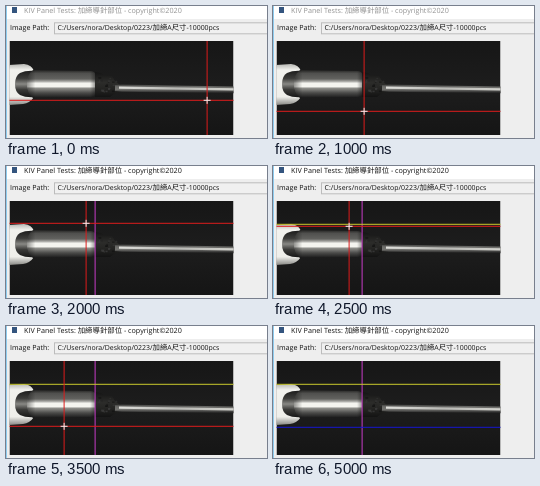
These frames come from a looping animation (261 px wide and 132 px high, 5.5 s). An HTML page with a canvas:

```html
<!DOCTYPE html>
<html lang="zh-Hant">
<head>
<meta charset="utf-8">
<style>
html, body { margin: 0; width: 100%; height: 100%; overflow: hidden; background: #eeeeee; }
#stage { position: relative; width: 261px; height: 132px; overflow: hidden; }
canvas { position: absolute; left: 0; top: 0; display: block; }
.row {
  position: absolute; white-space: pre; line-height: 12px; height: 12px; color: #111;
  font: 7.1px/12px "Open Sans", "Noto Sans", "Noto Sans CJK TC", "Noto Sans CJK", sans-serif;
  text-rendering: geometricPrecision;
}
.row b { font: 7.4px/12px "Noto Sans CJK TC", "Noto Sans CJK", sans-serif; }
#title { left: 18px; top: -1px; font-size: 7.2px; }
#label { left: 4px; top: 16px; }
#path { left: 51.5px; top: 16px; font-size: 6.95px; }
</style>
</head>
<body>
<div id="stage">
  <canvas id="view" width="261" height="132"></canvas>
  <div class="row" id="title">KIV Panel Tests: <b>加締導針部位</b> - copyright©2020</div>
  <div class="row" id="label">Image Path:</div>
  <div class="row" id="path">C:/Users/nora/Desktop/0223/<b>加締</b>A<b>尺寸</b>-10000pcs</div>
</div>
<script>
const ctx = document.getElementById('view').getContext('2d');
const title = document.getElementById('title');
const STEP = 500, LOOP = 5500;
const PHOTO = { x: 3.5, y: 35, w: 224, h: 94 };
const RED = '#dc1c1c', PINK = '#c83cc8', YELLOW = '#c8c82c', BLUE = '#1616d0';

// pointer position for each half second; null hides it
const pointer = [
  [201, 94], [146, 101], [91, 105], [87, 84], [80, 57], [76, 60],
  [72, 71], [58, 100], [72, 102], [96, 113], null
];
// guides appear when they are clicked into place
const guides = [
  { from: 3, x: 89, color: PINK },
  { from: 5, y: 58, color: YELLOW },
  { from: 8, y: 101, color: BLUE }
];

function rect(x, y, w, h, color) {
  ctx.fillStyle = color;
  ctx.fillRect(x, y, w, h);
}

function shade(x0, y0, x1, y1, stops) {
  const g = ctx.createLinearGradient(x0, y0, x1, y1);
  for (const [at, color] of stops) g.addColorStop(at, color);
  return g;
}

function shape(d, fill) {
  ctx.fillStyle = fill;
  ctx.fill(new Path2D(d));
}

function random(seed) {
  return () => (seed = (seed * 16807) % 2147483647) / 2147483647;
}

function drawWindow() {
  rect(0, 0, 261, 132, '#eeeeee');
  rect(0, 0, 261, 13, '#ffffff');
  rect(0, 0, 1, 132, '#8fcdf0');
  rect(6, 1, 5, 6, '#34557f');
  rect(48, 16.3, 213, 12, '#bcbcbc');
  rect(49, 17.3, 212, 10, '#f0f0f0');
}

function drawCap() {
  shape('M3 59 L18 58 Q26 59 28 65 L22 78 L28 91 Q24 97 17 98 L3 99Z',
    shade(0, 58, 0, 99, [[0, '#b8b8b4'], [.15, '#f2f2ee'], [.8, '#eeeeea'], [1, '#8a8a86']]));
  shape('M30 65 Q20 64 14 67 Q9 70 9 78 Q9 86 14 89 Q20 92 30 91Z',
    shade(0, 64, 0, 92, [[0, '#1a1a1a'], [.3, '#3c3c3a'], [.5, '#888884'], [.7, '#3a3a38'], [1, '#141414']]));
}

function drawRod() {
  const body = 'M27 64 L86 65 Q91 66 91 78 Q91 90 86 91 L27 92 Q21 87 21 78 Q21 69 27 64Z';
  shape(body, shade(0, 64, 0, 92, [
    [0, '#222221'], [.12, '#50504e'], [.32, '#62625f'], [.42, '#b4b4b0'], [.47, '#f4f4ef'],
    [.59, '#f4f4ef'], [.66, '#8c8c88'], [.82, '#4a4a48'], [1, '#181818']
  ]));
  shape(body, shade(21, 0, 91, 0, [
    [0, 'rgba(0,0,0,.4)'], [.12, 'rgba(0,0,0,0)'], [.9, 'rgba(0,0,0,0)'], [1, 'rgba(0,0,0,.5)']
  ]));
}

function drawJoint() {
  shape('M89 66 L95 67 L98 69 L106 70 L109 75 L114 79 L114 86 L108 88 L104 91 L89 91Z',
    shade(0, 66, 0, 92, [[0, '#141414'], [.4, '#2c2c2a'], [.6, '#262624'], [1, '#111']]));
  const next = random(71);
  for (let i = 0; i < 30; i++) {
    const x = 92 + next() * 18, y = 70 + next() * 16, v = 8 + next() * 70 | 0;
    rect(x, y, 1 + next() * 2, 1 + next(), `rgba(${v},${v},${v},.6)`);
  }
}

function drawWire() {
  shape('M109 79 L116 78.5 L228 80.5 L228 87.2 L116 85.7 L109 85Z',
    shade(0, 78, 0, 87, [[0, '#333332'], [.3, '#6a6a67'], [.6, '#72726f'], [1, '#1e1e1e']]));
  shape('M113 80.5 L228 82.3 L228 84.6 L113 82.8Z',
    shade(113, 0, 228, 0, [[0, '#dededa'], [.5, '#b9b9b5'], [1, '#d2d2cd']]));
}

function drawPhoto() {
  const { x, y, w, h } = PHOTO;
  ctx.save();
  ctx.beginPath();
  ctx.rect(x, y, w, h);
  ctx.clip();
  rect(x, y, w, h, shade(0, y, 0, y + h, [[0, '#161616'], [.5, '#1d1d1d'], [1, '#151515']]));
  drawCap();
  drawRod();
  drawJoint();
  drawWire();
  ctx.restore();
}

function line({ x, y, color }) {
  if (x !== undefined) rect(x - .4, PHOTO.y, 1, PHOTO.h, color);
  else rect(PHOTO.x, y - .2, PHOTO.w, 1, color);
}

function drawPointer([x, y]) {
  line({ x, color: RED });
  line({ y, color: RED });
  rect(x - 3.4, y - .2, 7, 1, '#f0f0f0');
  rect(x - .4, y - 3.2, 1, 7, '#f0f0f0');
}

let shown = -1;
function frame(now) {
  const step = Math.floor((now % LOOP) / STEP);
  if (step !== shown) {
    shown = step;
    title.style.color = step < 3 ? '#929292' : '#111';
    drawWindow();
    drawPhoto();
    guides.filter(g => step >= g.from).forEach(line);
    if (pointer[step]) drawPointer(pointer[step]);
  }
  requestAnimationFrame(t => frame(Math.max(0, t - start)));
}
const start = performance.now();
frame(0);
</script>
</body>
</html>
```
